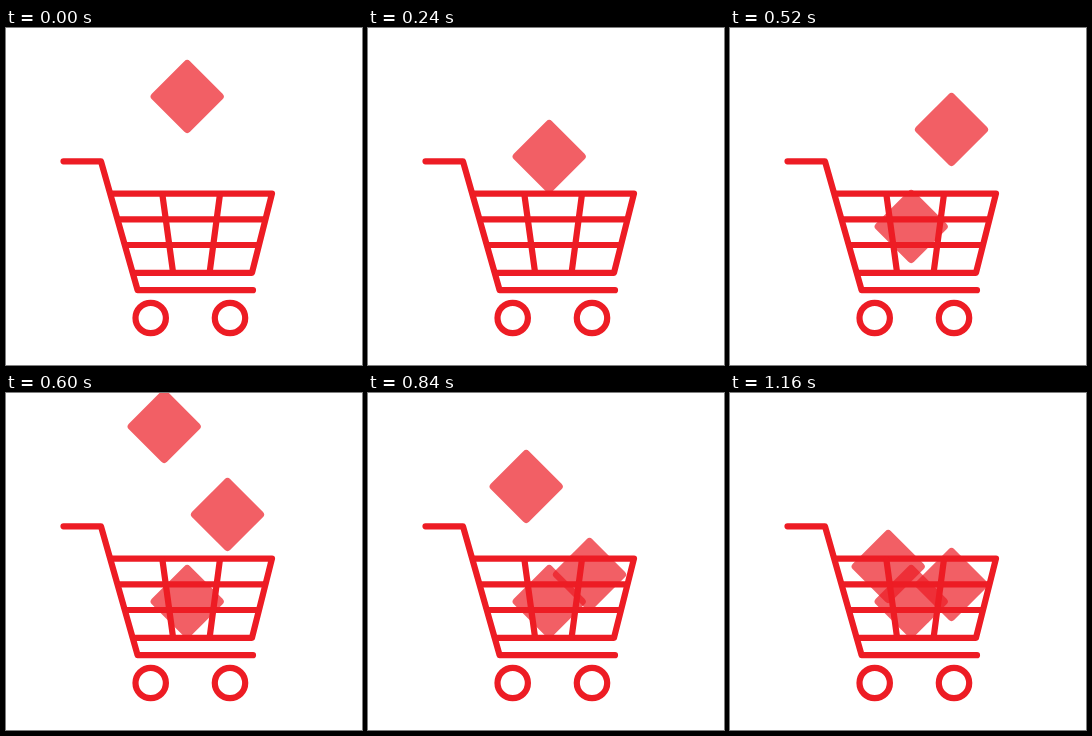
Animation of 356 by 337 pixels, one loop 1.2 s. Source, as an HTML page:

```html
<!DOCTYPE html>
<html lang="en">
<head>
<meta charset="utf-8">
<title>Shopping cart</title>
<style>
  html, body { margin: 0; width: 100%; height: 100%; overflow: hidden; background: #fff; }
  svg { display: block; width: 100vw; height: 100vh; }
  .cart { fill: none; stroke: #ed1c24; stroke-width: 6.2; stroke-linecap: round; stroke-linejoin: round; }
  .item { fill: #ed1c24; fill-opacity: .7; }
</style>
</head>
<body>
<svg viewBox="0 0 356 337">
  <g id="items"></g>
  <g class="cart">
    <path d="M57.5 133.3H95L131.6 262.2H247"/>
    <path d="M105 165.6H266L246 244.8H127"/>
    <path d="M113 191.3H259M120 217H252"/>
    <path d="M156.3 166L167 244M214 166L203.7 244"/>
    <circle cx="144.7" cy="290" r="15.2"/>
    <circle cx="224" cy="290" r="15.2"/>
  </g>
</svg>
<script>
  const LOOP = 1200, STEP = 40, FALL = 560, DROP = 140;
  // start time, x, first y
  const drops = [
    [0, 181.2, 68.5],
    [320, 221.5, 61.5 - 10],
    [600, 158.2, 33.5]
  ];

  const group = document.getElementById("items");
  const items = drops.map(() => {
    const r = document.createElementNS("http://www.w3.org/2000/svg", "rect");
    const side = 54;
    for (const [k, v] of Object.entries({
      class: "item", x: -side / 2, y: -side / 2, width: side, height: side, rx: 4
    })) r.setAttribute(k, v);
    return group.appendChild(r);
  });

  function draw(time) {
    const t = Math.floor((time % LOOP) / STEP) * STEP;
    drops.forEach(([start, x, y], i) => {
      const age = t - start;
      const fall = DROP * Math.min(Math.max(age / FALL, 0), 1);
      items[i].setAttribute("visibility", age < 0 ? "hidden" : "visible");
      items[i].setAttribute("transform", `translate(${x} ${y + fall}) rotate(45)`);
    });
  }

  const origin = performance.now();
  function tick() {
    draw(performance.now() - origin);
    requestAnimationFrame(tick);
  }
  tick();
</script>
</body>
</html>
```
